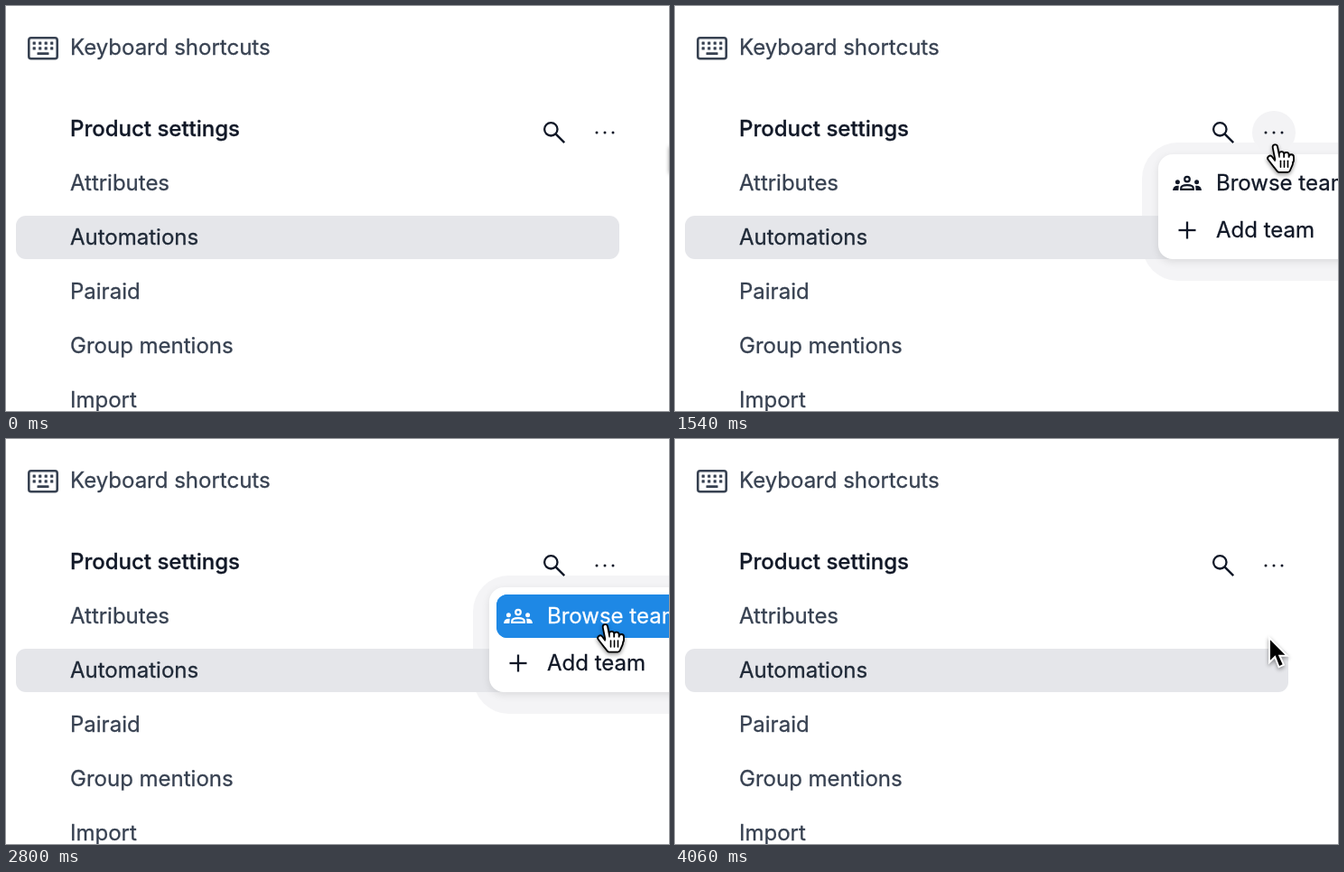
Write an HTML page with a canvas that moves like this. It is 734x448 px and loops after 4.13 s.

```html
<!DOCTYPE html>
<html lang="en">
<head>
<meta charset="utf-8">
<title>Product settings menu</title>
<style>
  html, body { margin: 0; width: 100%; height: 100%; overflow: hidden; background: #fff; }
  canvas { display: block; width: 734px; height: 448px; }
</style>
</head>
<body>
<canvas id="stage" width="734" height="448"></canvas>
<script>
const ctx = document.getElementById('stage').getContext('2d');
const LOOP = 4130, STEP = 70;
const INK = '#111827', TEXT = '#374151', ACTIVE = '#1f2937', GRAY = '#e5e6ea';

const linear = p => p;
const easeOut = p => 1 - (1 - p) ** 1.3;
const easeInOut = p => (1 - Math.cos(Math.PI * p)) / 2;
const ramp = (t, from, to) => Math.min(1, Math.max(0, (t - from) / (to - from)));

// The pointer enters, settles on the button, slides down the menu and leaves.
const ENTRY = { x: 736, y: 156 };
const MOVES = [
  { from: 0, to: 630, x: 668.5, y: 151.5, ease: easeOut },
  { from: 630, to: 770, x: 664, y: 155, ease: linear },
  { from: 1470, to: 2380, x: 663, y: 207.5, ease: easeInOut },
  { from: 3920, to: 4060, x: 659, y: 221, ease: linear }
];

function hotspot(t) {
  let { x, y } = ENTRY;
  for (const move of MOVES) {
    const p = move.ease(ramp(t, move.from, move.to));
    x += (move.x - x) * p;
    y += (move.y - y) * p;
  }
  return { x, y };
}

const ARROW = new Path2D('M9.2 7.3V18.5L12 15.8 14.25 21.6 16 20.8 13.6 15.5H17.4Z');

// Thumb, index finger, three curled fingers and the palm, drawn with a thick round stroke
function handSkeleton() {
  const hand = new Path2D('M9.8 15.8L13 20M12.55 9.65L14 17');
  for (let i = 0; i < 3; i++) {
    hand.moveTo(16.1 + 2.7 * i, 13.5 + 0.4 * i * i);
    hand.lineTo(16.1 + 2.7 * i, 17);
  }
  hand.addPath(new Path2D('M14 16.4H21.4L20.9 19 19.5 22.2H14.8L12.7 19.6Z'));
  return hand;
}
const HAND = handSkeleton();

function box(x, y, w, h, r, fill) {
  ctx.beginPath();
  ctx.roundRect(x, y, w, h, r);
  ctx.fillStyle = fill;
  ctx.fill();
}

function disc(x, y, r, fill) {
  ctx.beginPath();
  ctx.arc(x, y, r, 0, 2 * Math.PI);
  ctx.fillStyle = fill;
  ctx.fill();
}

function ring(x, y, r, width, color) {
  ctx.beginPath();
  ctx.arc(x, y, r, 0, 2 * Math.PI);
  ctx.lineWidth = width;
  ctx.strokeStyle = color;
  ctx.stroke();
}

function line(x1, y1, x2, y2, width, color) {
  ctx.beginPath();
  ctx.moveTo(x1, y1);
  ctx.lineTo(x2, y2);
  ctx.lineWidth = width;
  ctx.strokeStyle = color;
  ctx.stroke();
}

// A hairline stroke gives the slightly heavier smoothing of desktop text.
function label(str, x, y, color, weight = 400) {
  ctx.font = `${weight} 24px Inter, sans-serif`;
  ctx.fillStyle = ctx.strokeStyle = color;
  ctx.lineWidth = 0.3;
  ctx.fillText(str, x, y);
  ctx.strokeText(str, x, y);
}

function shadow(alpha, blur, dy) {
  ctx.shadowColor = `rgba(0,0,0,${alpha})`;
  ctx.shadowBlur = blur;
  ctx.shadowOffsetY = dy;
}

function faded(alpha, draw) {
  if (alpha <= 0) return;
  ctx.save();
  ctx.globalAlpha *= alpha;
  draw();
  ctx.restore();
}

function keyboardIcon() {
  ctx.strokeStyle = TEXT;
  ctx.lineWidth = 2.6;
  ctx.beginPath();
  ctx.roundRect(25.3, 35.3, 31.4, 23, 2.5);
  ctx.stroke();
  for (let i = 0; i < 8; i++) {
    box(29.6 + (i % 4) * 6.5, i < 4 ? 39.5 : 45.3, 3.2, 3.2, 0.5, TEXT);
  }
  box(34.5, 51.3, 13, 2.6, 0.5, TEXT);
}

function searchIcon() {
  ring(603.3, 136.3, 7.2, 2.3, INK);
  line(608.4, 141.4, 618.2, 151.2, 2.5, INK);
}

function peopleIcon(color) {
  ring(567, 191.6, 2.8, 2.2, color);
  ctx.stroke(new Path2D('M560.2 202.9V201.6Q560.2 198.2 567 198.2T573.8 201.6V202.9Z'));
  for (const side of [-1, 1]) {
    disc(567 + side * 10.6, 194.8, 2.5, color);
    ctx.beginPath();
    ctx.moveTo(567 + side * 16, 204);
    ctx.quadraticCurveTo(567 + side * 15.5, 198.2, 567 + side * 9.2, 198.8);
    ctx.lineTo(567 + side * 9.6, 204);
    ctx.fill();
  }
}

function sidebar(t) {
  keyboardIcon();
  label('Keyboard shortcuts', 71, 54, TEXT);
  label('Product settings', 71, 144, INK, 500);
  searchIcon();
  const button = ramp(t, 350, 490) * (1 - ramp(t, 1610, 1750));
  faded(button, () => disc(663, 140, 24, '#f3f3f5'));
  for (let i = -1; i <= 1; i++) disc(663 + 9 * i, 140, 1.5, INK);

  const hover = t < 4060 ? ramp(t, 2940, 3080) : 0;
  faded(hover, () => box(11, 172, 668, 48, 11, GRAY));
  box(11, 232, 668, 48, 11, GRAY);
  ['Attributes', 'Automations', 'Pairaid', 'Group mentions', 'Import'].forEach((name, i) => {
    const lit = i === 1 || (i === 0 && hover > 0.5);
    label(name, 71, 204 + i * 60, lit ? ACTIVE : TEXT);
  });
}

function menu(t) {
  ctx.save();
  ctx.globalCompositeOperation = 'darken';
  box(517, 151, 300, 153, 40, '#f4f4f6');
  ctx.restore();
  ctx.save();
  shadow(0.1, 10, 3);
  box(535, 164, 260, 116, 16, '#fff');
  ctx.restore();

  const lit = ramp(t, 1750, 1890);
  faded(lit, () => box(543, 172, 244, 48, 12, '#2196f3'));
  faded(ramp(t, 2660, 2800), () => box(543, 172, 244, 48, 12, '#1e88e5'));
  const front = lit > 0.4 ? '#fff' : INK;
  peopleIcon(front);
  label('Browse teams', 599, 204, front);

  line(557.5, 248, 576.5, 248, 2.3, INK);
  line(567, 238.5, 567, 257.5, 2.3, INK);
  label('Add team', 599, 256, INK);
}

function drawHand() {
  ctx.lineJoin = ctx.lineCap = 'round';
  ctx.strokeStyle = '#000';
  ctx.lineWidth = 3.6;
  shadow(0.4, 4, 2);
  ctx.stroke(HAND);
  ctx.shadowColor = 'transparent';
  ctx.strokeStyle = ctx.fillStyle = '#fff';
  ctx.lineWidth = 1.8;
  ctx.stroke(HAND);
  ctx.fill(HAND);
  for (let i = 0; i < 3; i++) line(15.6 + 2 * i, 17.3, 15.6 + 2 * i, 20.7, 0.8, '#000');
}

function drawArrow() {
  ctx.strokeStyle = '#fff';
  ctx.fillStyle = '#000';
  ctx.lineWidth = 2;
  shadow(0.4, 4, 2);
  ctx.stroke(ARROW);
  ctx.shadowColor = 'transparent';
  ctx.fill(ARROW);
}

function pointer(t) {
  const { x, y } = hotspot(t);
  const isHand = x < 685 && t < 4060;
  ctx.save();
  ctx.translate(x - (isHand ? 24.7 : 18.4), y - (isHand ? 19 : 13.3));
  ctx.scale(2, 2);
  if (isHand) drawHand(); else drawArrow();
  ctx.restore();
}

function render(now) {
  const t = Math.floor((now % LOOP) / STEP) * STEP;
  ctx.fillStyle = '#fff';
  ctx.fillRect(0, 0, 734, 448);
  sidebar(t);
  const opened = 1 - (1 - ramp(t, 840, 1260)) ** 2;
  faded(opened * (1 - ramp(t, 2870, 3150)), () => menu(t));
  pointer(t);
}

let start;
function tick(now) {
  start ??= now;
  render(now - start);
  requestAnimationFrame(tick);
}
render(0);
requestAnimationFrame(tick);
</script>
</body>
</html>
```
